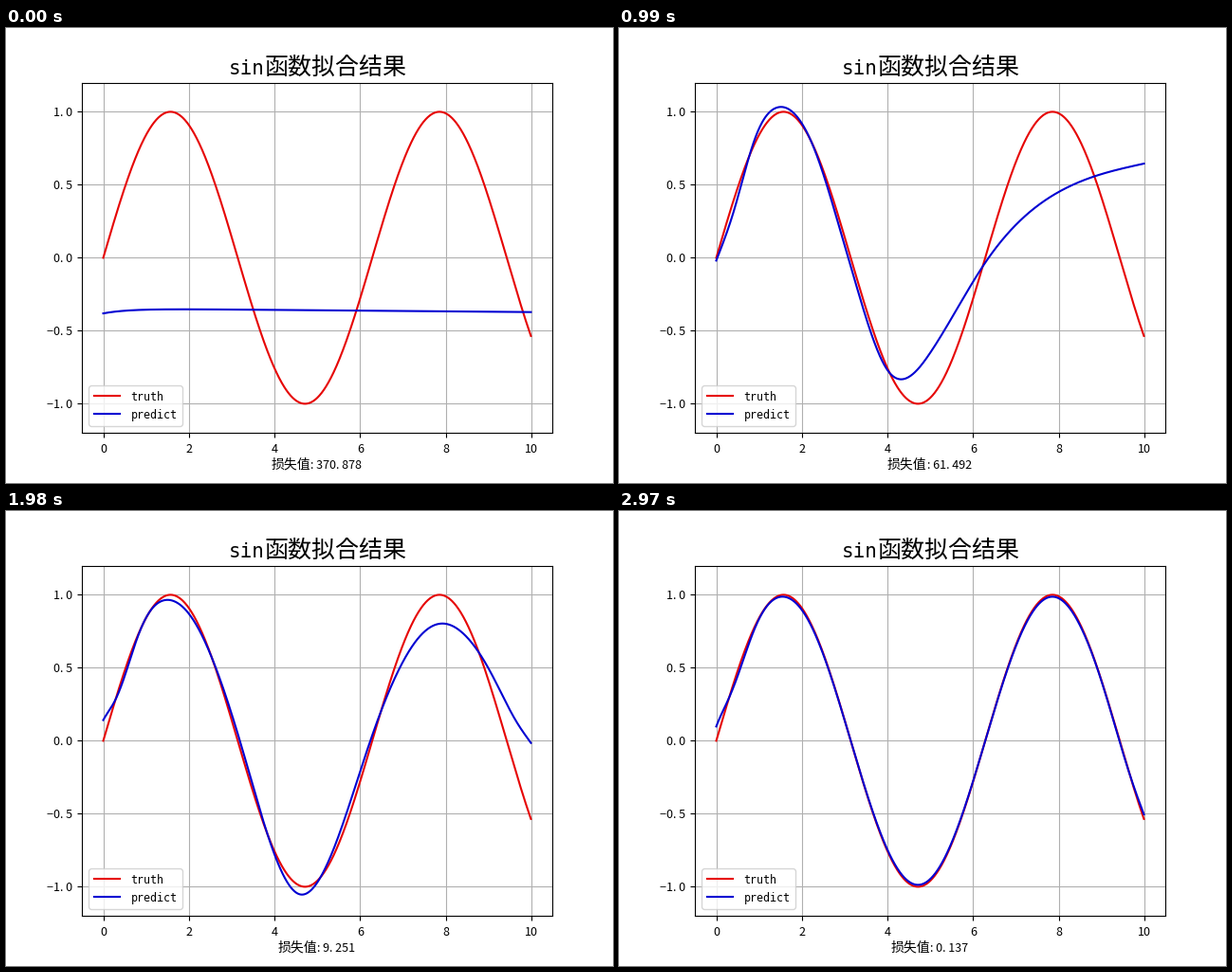
A matplotlib script for the animation above (3000 ms loop, 640x480 px).

```python
import matplotlib.pyplot as plt
import numpy as np
from matplotlib.animation import FuncAnimation

W, H, DPI = 640, 480, 100
FRAMES, INTERVAL = 100, 30
CJK, MONO = "Noto Sans CJK JP", "DejaVu Sans Mono"
EM = 10 * DPI / 72  # body text size in pixels

x = np.arange(0, 10, 0.01)
truth = np.sin(x)


def spline(*points):
    """Natural cubic spline through a few key points."""
    px, py = np.array(points).T
    h, slope = np.diff(px), np.diff(py) / np.diff(px)
    A, b = np.eye(len(px)), np.zeros(len(px))
    for i in range(1, len(px) - 1):
        A[i, i - 1:i + 2] = h[i - 1], 2 * (h[i - 1] + h[i]), h[i]
        b[i] = 6 * (slope[i] - slope[i - 1])
    m = np.linalg.solve(A, b)
    i = np.searchsorted(px, x, side="right") - 1
    t = (x - px[i]) / h[i]
    s = 1 - t
    bend = ((s**3 - s) * m[i] + (t**3 - t) * m[i + 1]) * h[i]**2 / 6
    return s * py[i] + t * py[i + 1] + bend


def near_truth(start, end):
    """Sine with small errors that ring out from both ends."""
    def ring(t):
        return np.exp(-2 * t) * np.cos(5 * t)
    return 0.987 * truth + start * ring(x) + end * ring(10 - x)


# Stages of the fit
flat = -0.347 - 0.0025 * x - 0.034 * np.exp(-1.7 * x)
slope = 0.03 + 0.85 * np.exp(-0.629 * (x / 2)**2.25)
first_wave = spline((0, -.05), (.4, .246), (.81, .72), (1.5, 1.12), (2.27, .764),
                    (2.94, 0), (4.1, -.635), (5, -.47), (8, .38), (10, .613))
deeper = spline((0, .015), (.5, .475), (1, .87), (1.42, .94), (2.27, .757), (3.22, 0),
                (4, -.93), (4.42, -1.06), (5, -.85), (6.28, 0), (8, .53), (10, .682))
steeper = spline((0, .123), (.25, .245), (.75, .7), (1.35, .932), (2.5, .6), (3.26, 0),
                 (4.57, -1.153), (5.12, -.918), (6.15, 0), (7, .39), (8, .555), (10, .642))

# (frame, loss, curve)
STAGES = [
    (0, 370.878, flat),
    (12, 188.404, slope),
    (24, 72.941, first_wave),
    (43, 49.917, deeper),
    (57, 43.872, steeper),
    (76, 0.256, near_truth(0.155, 0.05)),
    (99, 0.137, near_truth(0.098, 0.025)),
]


def ease(stage, u):
    if stage == 0:
        return 1 - (1 - u)**1.5
    if stage == 4:
        u = min(u / 0.85, 1)
        return u * u * (3 - 2 * u)
    return u


def fit(frame):
    """Predicted curve and its loss at a frame."""
    k = max(i for i, s in enumerate(STAGES[:-1]) if s[0] <= frame)
    (f0, l0, c0), (f1, l1, c1) = STAGES[k:k + 2]
    w = ease(k, (frame - f0) / (f1 - f0))
    loss = ((1 - w) * l0**0.5 + w * l1**0.5)**2
    return (1 - w) * c0 + w * c1, loss


def spaced(text):
    return text.replace(".", ". ").replace(":", ": ").replace("-", "\u2212")


fig, ax = plt.subplots(figsize=(W / DPI, H / DPI), dpi=DPI)


def write(px, py, text, size, family=CJK, ha="left"):
    return fig.text(px / W, 1 - py / H, text, size=size, family=family,
                    ha=ha, va="baseline")


ax.plot(x, truth, color="#e60404", label="truth")
predict, = ax.plot(x, flat, color="#0000d2", label="predict")
ax.set_xlim(-0.4995, 10.4895)
ax.set_ylim(-1.2, 1.2)
ax.set_xticks(range(0, 11, 2))
ax.set_yticks(np.arange(-1, 1.1, 0.5))
ax.yaxis.set_major_formatter(lambda v, _: spaced(f"{v:.1f}"))
ax.tick_params(labelsize=9, labelfontfamily=CJK)
ax.tick_params(axis="x", pad=4)
ax.grid(True)

legend = ax.legend(loc="lower left", fontsize=10, labelspacing=0.42)
for label in legend.get_texts():
    label.set(family=MONO, size=8.33)

write(273, 49, "sin", 15, MONO, ha="right")
write(272, 49, "函数拟合结果", 18)
caption = write(280, 465, "损失值", 10)
number = write(321, 465, "", 9)


def draw(frame):
    curve, loss = fit(frame)
    predict.set_ydata(curve)
    text = f":{loss:.3f}"
    left = W * 0.5125 - (3 + len(text) / 2) * EM / 2
    caption.set_x(left / W)
    number.set_x((left + 3 * EM) / W)
    number.set_text(spaced(text))
    return predict, caption, number


anim = FuncAnimation(fig, draw, frames=FRAMES, interval=INTERVAL,
                     init_func=lambda: draw(0), repeat=True, repeat_delay=0)
plt.show()
```
